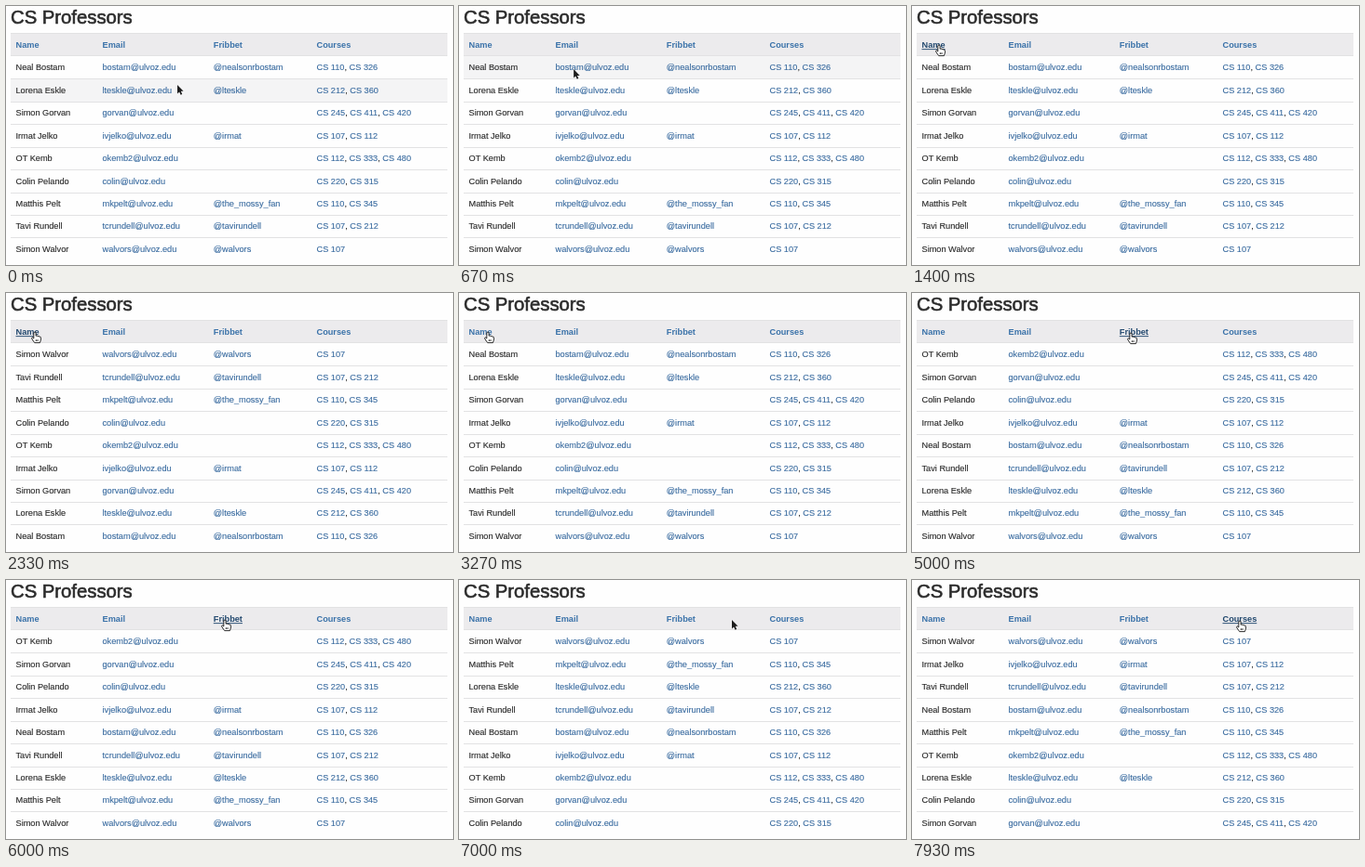
Recreate the animation shown at these times as an HTML page. Size 480 px wide and 279 px high, loop 8 s.

```html
<!DOCTYPE html>
<html lang="en">
<head>
<meta charset="utf-8">
<title>CS Professors</title>
<style>
  html, body { margin: 0; width: 100%; height: 100%; overflow: hidden; background: #fefefe; }
  svg { display: block; width: 480px; height: 279px; }
  text { font: 9.2px "Liberation Sans", Arial, sans-serif; fill: #262626; stroke: #262626; stroke-width: .12px; white-space: pre; }
  .title { font-size: 20.3px; fill: #2b2b2b; stroke: #2b2b2b; stroke-width: .6px; }
  .head { font-weight: bold; }
  .link { fill: #386a9f; stroke: #386a9f; }
  .head.link { fill: #3a72a9; stroke: none; }
  .head.link.hover { fill: #23496f; text-decoration: underline; }
  .rule { stroke: #e2e2e3; stroke-width: 1; }
</style>
</head>
<body>
<svg id="stage" viewBox="0 0 480 279"></svg>
<script>
const LOOP = 8000, ROW = 24.42, TOP = 54;
const columns = [10.5, 103.5, 222.8, 333.5];
const titles = ["Name", "Email", "Fribbet", "Courses"];
const people = [
  ["Neal Bostam", "bostam", "@nealsonrbostam", "110 326"],
  ["Lorena Eskle", "lteskle", "@lteskle", "212 360"],
  ["Simon Gorvan", "gorvan", "", "245 411 420"],
  ["Irmat Jelko", "ivjelko", "@irmat", "107 112"],
  ["OT Kemb", "okemb2", "", "112 333 480"],
  ["Colin Pelando", "colin", "", "220 315"],
  ["Matthis Pelt", "mkpelt", "@the_mossy_fan", "110 345"],
  ["Tavi Rundell", "tcrundell", "@tavirundell", "107 212"],
  ["Simon Walvor", "walvors", "@walvors", "107"]
];

// [time, order of people from top to bottom]
const sorts = [
  [0, "012345678"],
  [2130, "876543210"],
  [2930, "012345678"],
  [4930, "425307168"],
  [6070, "861703425"],
  [7600, "837064152"]
];

// [time, x, y] of the pointer's hot spot
const path = [
  [0, 184, 85], [350, 184, 85], [1100, 29, 42], [1800, 29, 42],
  [2000, 31, 42], [3500, 31, 42], [4270, 235, 43], [6400, 235, 43],
  [7000, 293, 43], [7400, 352, 44], [8000, 352, 44]
];

const stage = document.getElementById("stage");

function add(tag, attrs, parent = stage, content = "") {
  const node = document.createElementNS("http://www.w3.org/2000/svg", tag);
  for (const key in attrs) node.setAttribute(key, attrs[key]);
  node.textContent = content;
  parent.appendChild(node);
  return node;
}

add("text", { x: 5, y: 18.9, class: "title" }, stage, "CS Professors");
add("rect", { x: 5, y: 29, width: 469, height: 25, fill: "#ecebed" });
const shade = add("rect", { x: 5, width: 469, height: ROW, fill: "#f4f4f5" });
add("path", { d: "M5 29.5H474M5 53.5H474", class: "rule" });
for (let i = 1; i < people.length; i++) {
  const y = Math.round(TOP + i * ROW) + .5;
  add("path", { d: `M5 ${y}H474`, class: "rule" });
}
const heads = titles.map((label, i) =>
  add("text", { x: columns[i], y: 45.2, class: "head link" }, stage, label));

const rows = people.map(([name, mail, handle, courses]) => {
  const row = add("g", {});
  add("text", { x: columns[0], y: 0 }, row, name);
  add("text", { x: columns[1], y: 0, class: "link" }, row, mail + "@ulvoz.edu");
  add("text", { x: columns[2], y: 0, class: "link" }, row, handle);
  const list = add("text", { x: columns[3], y: 0 }, row);
  courses.split(" ").forEach((number, i) => {
    if (i) add("tspan", {}, list, ", ");
    add("tspan", { class: "link" }, list, "CS " + number);
  });
  return row;
});

const arrow = add("path", {
  d: "M0 0V9.4L2.1 7.4L3.6 10.7L5.2 10L3.8 6.8H6.6Z",
  fill: "#1c1c1c", stroke: "#fff", "stroke-width": .8, "paint-order": "stroke"
});
const hand = add("path", {
  d: "M-1.2 .7Q0 -.8 1.1 .7V4.2Q2.3 3.4 3.1 4.6Q4.3 3.9 4.9 5.1Q6.5 4.8 6.5 6.4V8.2L5.4 11.6H-.3L-3.3 7.3Q-3.6 5.8 -2.4 5.9L-1.2 7Z" +
     "M1.3 8.2V10M3 8.2V10",
  fill: "#fff", stroke: "#161616", "stroke-width": .9, "stroke-linejoin": "round"
});

function pointerAt(t) {
  const i = path.findIndex(point => point[0] > t);
  const [t0, x0, y0] = path[i - 1], [t1, x1, y1] = path[i];
  const u = (t - t0) / (t1 - t0), ease = u * u * (3 - 2 * u);
  return [x0 + (x1 - x0) * ease, y0 + (y1 - y0) * ease];
}

const widths = heads.map(head => head.getComputedTextLength());

function draw(t) {
  const order = sorts.filter(step => step[0] <= t).pop()[1];
  [...order].forEach((person, i) =>
    rows[person].setAttribute("transform", `translate(0 ${69.4 + i * ROW})`));

  const [x, y] = pointerAt(t);
  const over = y > 36 && y < 48
    ? columns.findIndex((left, i) => x >= left && x <= left + widths[i]) : -1;
  const released = t >= 2930 && t < 3500;
  heads.forEach((head, i) => head.classList.toggle("hover", i === over && !released));

  const line = Math.floor((y - TOP) / ROW);
  shade.setAttribute("y", TOP + line * ROW);
  shade.style.display = line >= 0 ? "" : "none";
  for (const shape of [arrow, hand]) {
    shape.setAttribute("transform", `translate(${x} ${y})`);
    shape.style.display = (shape === hand) === (over >= 0) ? "" : "none";
  }
}

const start = performance.now();
function tick() {
  draw((performance.now() - start) % LOOP);
  requestAnimationFrame(tick);
}
tick();
</script>
</body>
</html>
```
